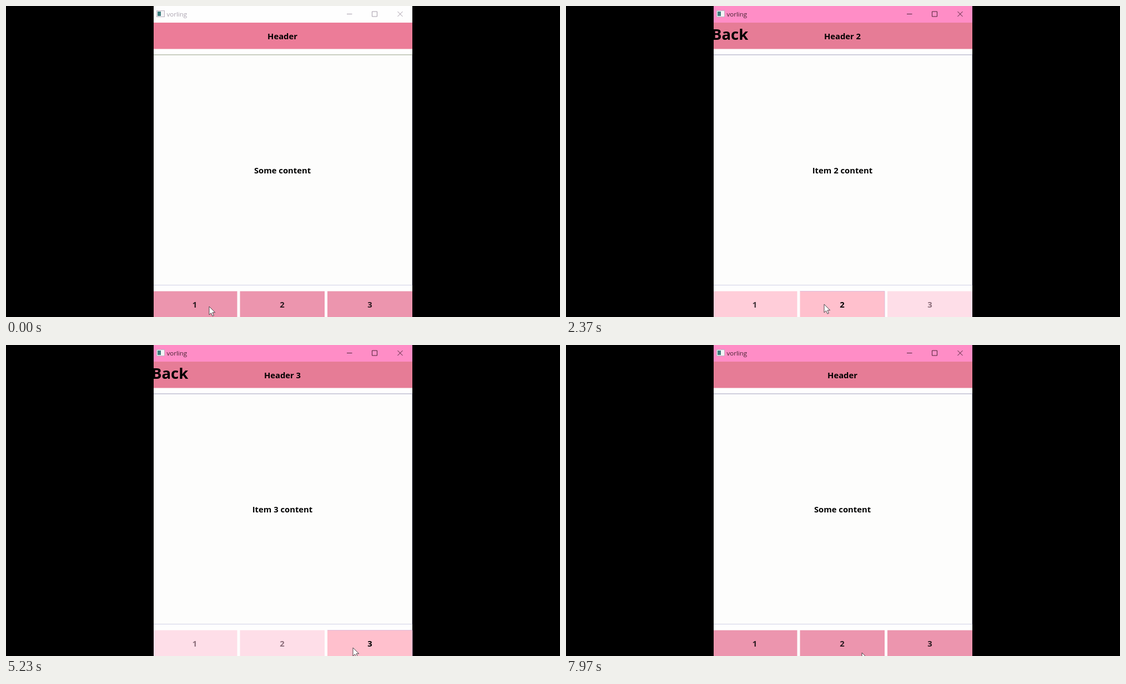
Recreate the animation shown at these times as an HTML page. Size 998 px wide and 561 px high, loop 8 s.

```html
<!DOCTYPE html>
<html lang="en">
<head>
<meta charset="utf-8">
<title>Window</title>
<style>
  html, body { margin: 0; width: 100%; height: 100%; overflow: hidden; background: #000; }
  svg { display: block; width: 100vw; height: 100vh; }
  text { font-family: "Open Sans", "Noto Sans", sans-serif; }
  .label { font-weight: 700; font-size: 14.8px; text-anchor: middle; }
</style>
</head>
<body>
<svg viewBox="0 0 998 561">
  <rect width="998" height="561"/>
  <rect x="266" width="466" height="561" fill="#fefefe"/>
  <rect id="bar" x="266" y="0" width="466" height="30"/>
  <rect x="271.5" y="8.5" width="14" height="11" fill="#f4f4f6" stroke="#b9b3c0"/>
  <rect x="273" y="10" width="6" height="8" fill="#3f7f80"/>
  <text id="title" x="289.5" y="19" font-size="11.5">vorling</text>
  <path id="controls" d="M614 14.5h9.5M659.5 10h9v9h-9zM705.5 10l9 9M714.5 10l-9 9" fill="none"/>
  <rect id="header" x="266" y="30" width="466" height="47.5"/>
  <text id="heading" class="label" x="498" y="59.5"></text>
  <text id="back" x="262" y="60.5" font-size="27.5" font-weight="700">Back</text>
  <rect x="266" y="88" width="466" height="415.5" fill="#fdfdfc"/>
  <path d="M731.5 88V503.5H266" fill="none" stroke="#d2d1e6"/>
  <path id="topLine" d="M266 88H732" stroke-width="1.3"/>
  <text id="content" class="label" x="498" y="302.3"></text>
  <g id="tabs"></g>
  <path id="cursor" d="M0 0V15L3.5 11.7 6 17.3 8.4 16.2 6 10.8H10.7Z" fill="#fff" stroke="#3a3338" stroke-width="0.9" stroke-linejoin="round"/>
</svg>
<script>
const LOOP = 8000, FADE = 260, ACTIVE_AT = 230, BACK_AT = 700;

// [time, open page]; page 0 is the start page
const pages = [[-1000, 0], [250, 1], [2250, 2], [4250, 3], [6450, 0]];

// [start, end, x, y]: the pointer glides to x, y between start and end
const moves = [
  [0, 0, 366, 542],
  [1250, 1900, 465, 538],
  [2700, 3350, 625, 546],
  [5400, 6200, 300, 52],
  [7200, 8000, 534, 557]
];

const looks = {
  home: { fill: [236, 149, 174], ink: [42, 26, 32] },
  open: { fill: [255, 192, 205], ink: [0, 0, 0] },
  idle: { fill: [254, 222, 232], ink: [140, 110, 122] }
};

const $ = id => document.getElementById(id);
const set = (el, attrs) => { for (const k in attrs) el.setAttribute(k, attrs[k]); };
const clamp = v => Math.min(1, Math.max(0, v));
const ease = v => v * v * (3 - 2 * v);
const mix = (a, b, p) => `rgb(${a.map((v, i) => Math.round(v + (b[i] - v) * p))})`;
const say = (el, s) => { if (el.textContent !== s) el.textContent = s; };

function add(name, attrs) {
  const el = document.createElementNS("http://www.w3.org/2000/svg", name);
  set(el, attrs);
  return $("tabs").appendChild(el);
}

const tabs = [[266, 416.5, 340], [421.5, 574, 497.5], [579, 732, 655.5]].map(([x, end, mid], i) => {
  const tab = {
    box: add("rect", { x, y: 514.5, width: end - x, height: 47 }),
    edge: add("path", { d: `M${x} 514.5H${end}V561`, fill: "none", stroke: "#d9b4d6", "stroke-width": 0.8 }),
    text: add("text", { class: "label", x: mid, y: 544.3 })
  };
  tab.text.textContent = i + 1;
  return tab;
});

const lookOf = (page, n) => page === 0 ? looks.home : page === n ? looks.open : looks.idle;

function pointer(t) {
  let [, , x, y] = moves[0];
  for (const [start, end, tx, ty] of moves.slice(1)) {
    const p = ease(clamp((t - start) / (end - start)));
    x += (tx - x) * p;
    y += (ty - y) * p;
  }
  return [x, y];
}

function draw(t) {
  const now = pages.findLastIndex(([at]) => t >= at);
  const [since, page] = pages[now];
  const before = pages[Math.max(0, now - 1)][1];
  const p = ease(clamp((t - since) / FADE));
  const active = t >= ACTIVE_AT;

  set($("bar"), { fill: active ? "#ff8dc6" : "#fefefe" });
  set($("title"), { fill: active ? "#43202f" : "#aaa2ae" });
  set($("controls"), { stroke: active ? "#4a2436" : "#a59caa" });
  set($("header"), { fill: active ? "#e67c96" : "#ec7c98" });
  set($("topLine"), { stroke: active ? "#c0bfd2" : "#b9bfae" });
  set($("back"), { opacity: page ? clamp((t - BACK_AT) / 150) : 0 });

  say($("heading"), page ? `Header ${page}` : "Header");
  say($("content"), page ? `Item ${page} content` : "Some content");

  tabs.forEach((tab, i) => {
    const from = lookOf(before, i + 1), to = lookOf(page, i + 1);
    const q = to === looks.open ? 1 : p;
    set(tab.box, { fill: mix(from.fill, to.fill, q) });
    set(tab.text, { fill: mix(from.ink, to.ink, q) });
    set(tab.edge, { opacity: to === looks.open ? 1 : 0 });
  });

  set($("cursor"), { transform: `translate(${pointer(t)})` });
}

function tick() {
  draw(performance.now() % LOOP);
  requestAnimationFrame(tick);
}
tick();
</script>
</body>
</html>
```
